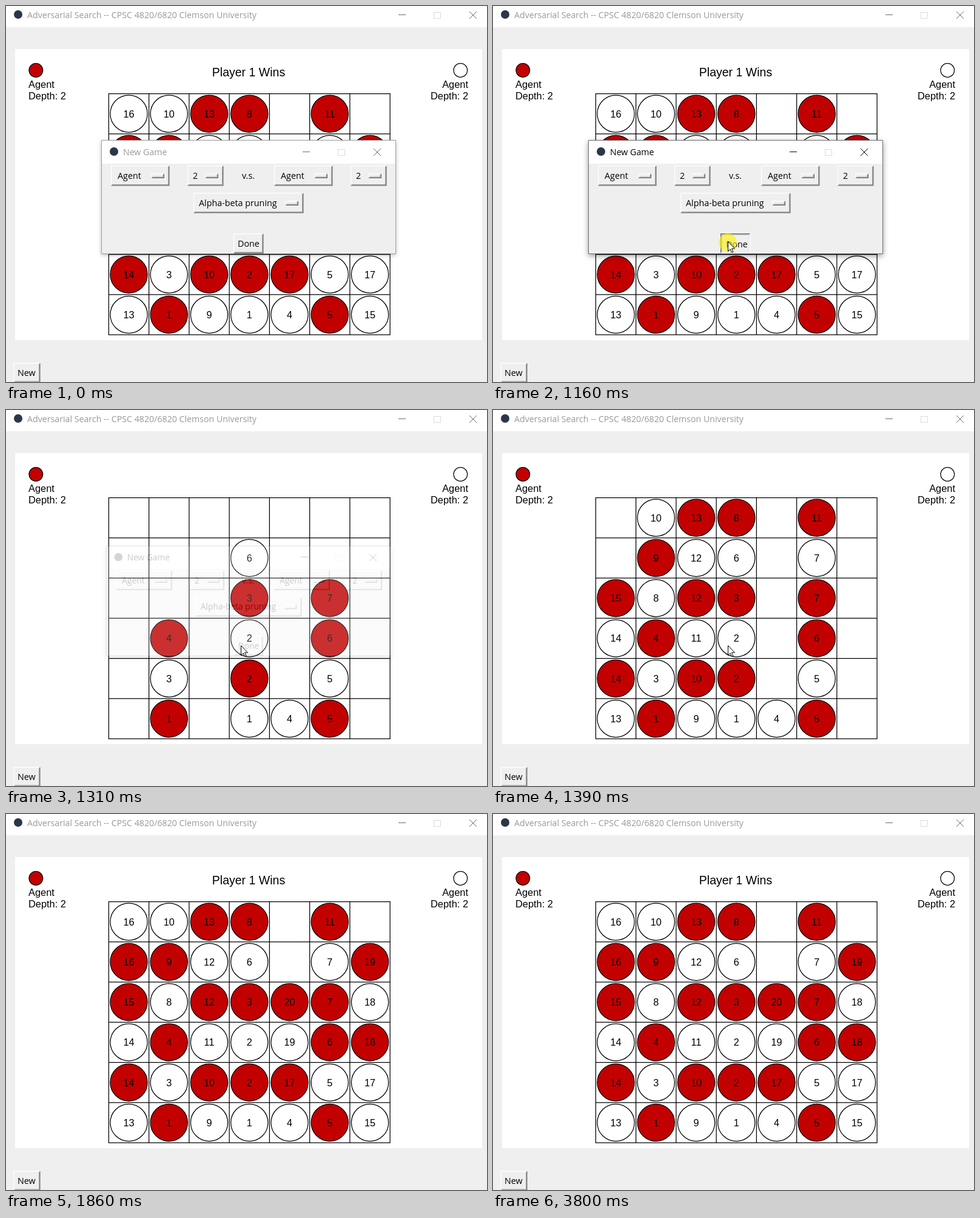
Recreate the animation shown at these times as an HTML page. Size 793 by 620 pixels, loop 3.88 s.

```html
<!DOCTYPE html>
<html lang="en">
<head>
<meta charset="utf-8">
<title>Adversarial Search</title>
<style>
  html, body { margin: 0; width: 100%; height: 100%; overflow: hidden; background: #efefef; }
  svg { display: block; }
  text { white-space: pre; }
  .ui { font: 14.3px "Open Sans", "Noto Sans", sans-serif; }
  .title { font: 14.2px "Open Sans", "Noto Sans", sans-serif; }
  .canvas { font: 16.4px "Liberation Sans", Arial, sans-serif; }
  .number { font: 16.25px "Liberation Sans", Arial, sans-serif; text-anchor: middle; }
  .result { font: 19.5px "Liberation Sans", Arial, sans-serif; text-anchor: middle; }
  .crisp { shape-rendering: crispEdges; }
  .soft { stroke-width: 1.25; }
  #dialog { --ink: #999; --line: #6a6a6a; --edge: #a0a0a0; --shadow: drop-shadow(0 2px 3px rgba(0,0,0,.25)); }
  #dialog.focused { --ink: #000; --line: #000; --edge: #707070; --shadow: drop-shadow(0 3px 5px rgba(0,0,0,.4)); }
  #frame { stroke: var(--edge); filter: var(--shadow); }
</style>
</head>
<body>
<svg id="stage" width="793" height="620" viewBox="0 0 793 620"></svg>
<script>
const LOOP = 3880;
const RED = '#c30000', FACE = '#efefef', ICON = '#2b3648';
const UNIT = 1.25; // the window content is drawn at 125 %
const stage = document.getElementById('stage');

function add(parent, tag, attrs = {}, content) {
  const el = document.createElementNS('http://www.w3.org/2000/svg', tag);
  for (const name in attrs) el.setAttribute(name, attrs[name]);
  if (content !== undefined) el.textContent = content;
  parent.append(el);
  return el;
}
const group = (parent, id) => add(parent, 'g', id ? { id } : {});
const rect = (parent, x, y, width, height, fill, more) =>
  add(parent, 'rect', { x, y, width, height, fill, class: 'crisp', ...more });
const path = (parent, d, stroke, more) => add(parent, 'path', { d, stroke, fill: 'none', ...more });
const text = (parent, x, y, content, cls = 'ui', more) =>
  add(parent, 'text', { x, y, class: cls, ...more }, content);
const circle = (parent, cx, cy, r, fill, more) =>
  add(parent, 'circle', { cx, cy, r, fill, ...more });
const show = (el, visible) => { el.style.display = visible ? '' : 'none'; };

function windowBar(parent, x, y, w, title, ink, line) {
  const mid = y + 15;
  circle(parent, x + 20, mid - 1, 7, ICON);
  text(parent, x + 35, mid + 5, title, 'title', { style: `fill:${ink}` });
  path(parent, `M${x + w - 146} ${mid - .5}h12`, '', { class: 'crisp', style: `stroke:${line}` });
  path(parent, `M${x + w - 87.5} ${mid - 4.5}h11v10h-11z`, '#dcdcdc', { class: 'crisp' });
  path(parent, `M${x + w - 29} ${mid - 6}l12 12m0 -12l-12 12`, '', { style: `stroke:${line}` });
}

// A bevel two units deep; the tones swap for a pressed look.
function bevel(parent, x, y, w, h, pressed) {
  const [light, dark, mid] = pressed ? ['#696969', '#fff', '#e3e3e3'] : ['#fff', '#696969', '#a0a0a0'];
  const soft = { class: 'soft' };
  const near = UNIT / 2, deep = UNIT * 1.5;
  const topLeft = d => `M${x + d} ${y + h - d}V${y + d}H${x + w - d}`;
  const bottomRight = d => `M${x + d} ${y + h - d}H${x + w - d}V${y + d}`;
  add(parent, 'rect', { x, y, width: w, height: h, fill: FACE });
  path(parent, topLeft(near), light, soft);
  if (pressed) path(parent, topLeft(deep), '#a0a0a0', soft);
  path(parent, bottomRight(deep), mid, soft);
  path(parent, bottomRight(near), dark, soft);
}

function button(parent, x, y, w, h, label, pad, pressed) {
  const g = group(parent);
  bevel(g, x, y, w, h, pressed);
  const shift = pressed ? 1 : 0;
  text(g, x + pad + shift, y + 21.6 + shift, label);
  return g;
}

function menu(parent, x, y, w, label, pad) {
  button(parent, x, y, w, 33.5, label, pad);
  bevel(parent, x + w - 30, y + 13, 21.5, 8);
}

function player(x, cx, fill, anchor) {
  circle(stage, cx, 106, 11.3, fill, { stroke: '#000', class: 'soft' });
  text(stage, x, 135, 'Agent', 'canvas', { 'text-anchor': anchor });
  text(stage, x, 154, 'Depth: 2', 'canvas', { 'text-anchor': anchor });
}

// Main window
rect(stage, 0, 0, 793, 620, FACE);
rect(stage, 0, 0, 793, 35, '#fff');
windowBar(stage, 0, 0, 793, 'Adversarial Search -- CPSC 4820/6820 Clemson University', '#999', '#6a6a6a');
rect(stage, 15, 71, 770, 480, '#fff');
player(37, 49.3, RED, 'start');
player(762, 749.3, '#fff', 'end');
const result = text(stage, 400, 116, 'Player 1 Wins', 'result');
button(stage, 12.5, 588.5, 44, 32.5, 'New', 6.5);

// Board: colour and turn of each disc, top row first
const BOARD = [
  'w16 w10 r13 r8 - r11 -',
  'r16 r9 w12 w6 - w7 r19',
  'r15 w8 r12 r3 r20 r7 w18',
  'w14 r4 w11 w2 w19 r6 r18',
  'r14 w3 r10 r2 r17 w5 w17',
  'w13 r1 w9 w1 w4 r5 w15'
];
const PITCH = 53 * UNIT, LEFT = 169.4, TOP = 144.5, MOVES = 39;
const gridX = i => LEFT + PITCH * i;
const gridY = i => TOP + PITCH * i;
let grid = '';
for (let i = 0; i < 8; i++) grid += `M${gridX(i)} ${gridY(0)}V${gridY(6)}`;
for (let i = 0; i < 7; i++) grid += `M${gridX(0)} ${gridY(i)}H${gridX(7)}`;
path(stage, grid, '#000', { class: 'soft', 'stroke-linecap': 'square' });

const discs = [];
BOARD.forEach((line, row) => line.split(' ').forEach((cell, col) => {
  if (cell === '-') return;
  const red = cell[0] === 'r', turn = +cell.slice(1);
  const x = gridX(col + .5), y = gridY(row + .5);
  const el = group(stage);
  circle(el, x, y, 24.5 * UNIT, red ? RED : '#fff', { stroke: '#000', class: 'soft' });
  text(el, x, y + 6, turn, 'number');
  discs.push({ el, order: 2 * turn - (red ? 1 : 0) });
}));

// Dialog
const dialog = group(stage, 'dialog');
rect(dialog, 157.5, 221.5, 485, 187, FACE, { id: 'frame' });
rect(dialog, 158, 222, 484, 38, '#fff');
windowBar(dialog, 158, 226, 477, 'New Game', 'var(--ink)', 'var(--line)');
menu(dialog, 173, 263, 96.5, 'Agent', 11);
menu(dialog, 299, 263, 59.5, '2', 9);
text(dialog, 389, 284.6, 'v.s.');
menu(dialog, 442, 263, 96.5, 'Agent', 11);
menu(dialog, 568, 263, 59.5, '2', 9);
menu(dialog, 309, 308, 181.5, 'Alpha-beta pruning', 9);
const doneUp = button(dialog, 375, 375, 49.5, 33, 'Done', 7);
const doneDown = button(dialog, 375, 375, 49.5, 33, 'Done', 8, true);

const click = circle(stage, 387, 390, 15, '#fff000', { 'fill-opacity': .6 });
const cursor = path(stage, 'M.5 .5V16.5L4.2 13L6.6 18.5L9 17.5L6.6 12H11.5Z', '#000', { style: 'fill:#fff' });

// Each row starts at its time and holds until the next one.
const CURSOR = [
  [0], [150, 753, 597], [230, 690, 535], [300, 600, 455], [380, 500, 385], [460, 430, 356],
  [530, 398, 362], [610, 389, 379], [690, 388, 384], [760, 387, 387], [840, 387, 388],
  [1710, 270, 392], [1790, 96, 397], [1860], [2950, 785, 594], [3030, 700, 608], [3100]
];
const PLAYED = [[0, MOVES], [1240, 0], [1310, 13], [1390, 29], [1460, MOVES]];
const DIALOG = [[0, 1, 1], [1240, .95, .995], [1310, .2, .967], [1390, 0, .95]];
const at = (steps, t) => steps.findLast(step => step[0] <= t).slice(1);

function draw(t) {
  const [x, y] = at(CURSOR, t);
  show(cursor, x !== undefined);
  if (x !== undefined) cursor.setAttribute('transform', `translate(${x} ${y})`);

  const [played] = at(PLAYED, t);
  discs.forEach(disc => show(disc.el, disc.order <= played));
  show(result, played === MOVES);

  const [opacity, scale] = at(DIALOG, t);
  const pressed = t >= 1160 && t < 1240;
  show(dialog, opacity > 0);
  dialog.setAttribute('opacity', opacity);
  dialog.setAttribute('transform', `translate(400 315) scale(${scale}) translate(-400 -315)`);
  dialog.classList.toggle('focused', t >= 1160);
  show(doneUp, !pressed);
  show(doneDown, pressed);
  show(click, pressed);
}

const start = performance.now();
function tick() {
  draw((performance.now() - start) % LOOP);
  requestAnimationFrame(tick);
}
tick();
</script>
</body>
</html>
```
